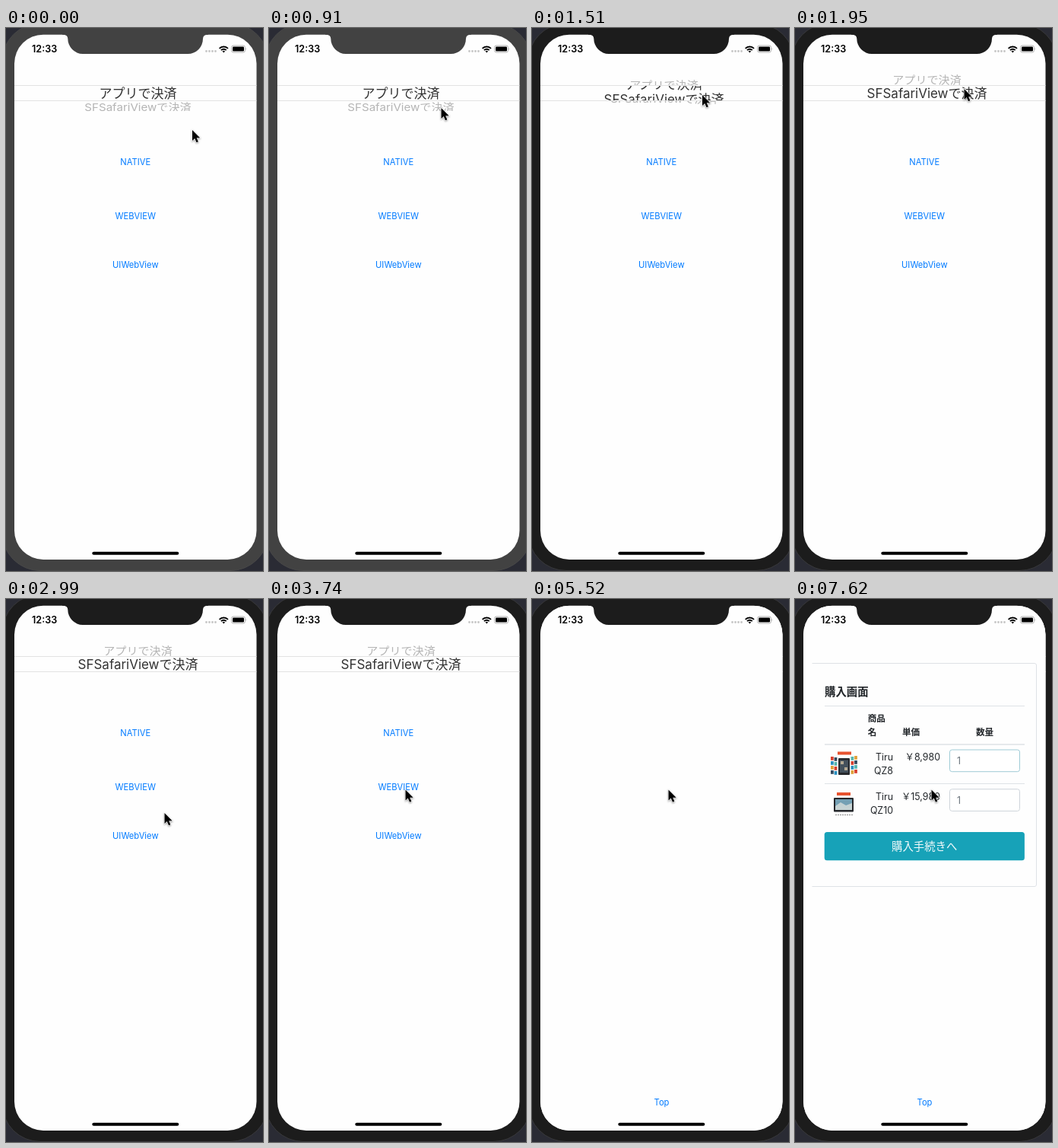
An HTML page for the animation above (8000 ms loop, 338x713 px).

```html
<!DOCTYPE html>
<html lang="ja">
<head>
<meta charset="utf-8">
<style>
  html, body { margin: 0; width: 100%; height: 100%; overflow: hidden; background: #2a2b34; }
  svg { display: block; width: 338px; height: 713px; }
  text { font-family: Inter, "Noto Sans CJK JP", "Noto Sans CJK", sans-serif; }
  .mid { text-anchor: middle; }
  .end { text-anchor: end; }
  .link { font-size: 11.2px; fill: #007aff; text-anchor: middle; }
  .head { font-size: 11.6px; font-weight: 700; }
  .cell { font-size: 12.4px; }
  .page { fill: #212529; }
  .rule { stroke: #dee2e6; fill: none; }
  .field { fill: #fff; stroke: #ced4da; }
</style>
</head>
<body>
<svg viewBox="0 0 338 713">
  <defs>
    <clipPath id="screen"><rect x="11" y="8.7" width="318.5" height="689.3" rx="38"/></clipPath>
    <clipPath id="band"><rect x="11" y="76" width="319" height="19"/></clipPath>
    <clipPath id="rim"><path d="M11 61H330V75H11ZM11 96H330V109H11Z"/></clipPath>
  </defs>
  <rect id="bezel" x="-5" y="-6" width="350" height="718.5" rx="50" stroke="#3c3c3e"/>

  <g clip-path="url(#screen)">
    <rect width="338" height="713" fill="#fefefe"/>
    <g clip-path="url(#rim)" id="outer" fill="#b4b4b4" font-size="15.1"></g>
    <g clip-path="url(#band)" id="inner" fill="#333" font-size="17"></g>
    <path d="M11 75.5H330M11 95.5H330" stroke="#e2e2e2"/>
    <text class="link" x="170.3" y="179.8">NATIVE</text>
    <text class="link" x="170.3" y="251.3" id="webview">WEBVIEW</text>
    <text class="link" x="170.3" y="315.3">UIWebView</text>

    <g id="modal">
      <rect y="9" width="338" height="713" fill="#fefefe"/>
      <text class="link" x="170.5" y="664.5">Top</text>
      <g id="shop" class="page">
        <path class="rule" d="M22.5 84.5H315Q317.5 84.5 317.5 87V375Q317.5 377.5 315 377.5H22.5"/>
        <text x="39" y="127" font-size="14.4" font-weight="700">購入画面</text>
        <path class="rule" d="M39 140.5H302M39 242.5H302"/>
        <path class="rule" d="M39 191H302" stroke-width="1.6"/>
        <g class="head">
          <text x="95.7" y="161">商品</text><text x="95.7" y="179.3">名</text>
          <text x="141" y="179.3">単価</text><text x="238" y="179.3">数量</text>
        </g>
        <g id="rows"></g>
        <rect x="38.7" y="306" width="263.2" height="37.3" rx="3.5" fill="#17a2b8"/>
        <text class="mid" x="170.2" y="330" font-size="14.4" fill="#f2fafb">購入手続きへ</text>
        <rect x="56" y="200.5" width="18" height="4" fill="#e8532f"/>
        <g id="tiles"></g>
        <rect x="57" y="209" width="15" height="22" rx="1" fill="#26282c"/>
        <rect x="59" y="211.500" width="11" height="16.500" fill="#44515c"/>
        <path d="M60 213H64V217H60ZM65 221H69V225H65Z" fill="#b3a892"/>
        <rect x="55" y="254" width="18" height="4" fill="#e8532f"/>
        <rect x="51" y="261" width="26" height="18.500" rx="1" fill="#25272b"/>
        <rect x="53" y="263" width="22" height="14" fill="#74a0b4"/>
        <path d="M53 272L60 267L67 271L75 268V277H53Z" fill="#c5d2d3"/>
        <path d="M53 283.500H76" stroke="#888" stroke-dasharray="2 1"/>
      </g>
    </g>

    <text x="34" y="32" font-size="12.6" font-weight="600">12:33</text>
    <path d="M263.500 30.500H278" stroke="#c6c6c6" stroke-width="2.800" stroke-linecap="round" stroke-dasharray="0 4"/>
    <g fill="none" stroke="#000" stroke-width="1.900">
      <path d="M280.600 26.900A8 8 0 0 1 292 26.900M282.900 29.200A4.700 4.700 0 0 1 289.700 29.200"/>
      <path d="M284.500 30.600A2.600 2.600 0 0 1 288.100 30.600L286.300 32.400Z" fill="#000" stroke="none"/>
    </g>
    <rect x="296.500" y="23" width="18" height="9" rx="2.500" fill="none" stroke="#aaa" stroke-width=".9"/>
    <rect x="298" y="24.400" width="15" height="6.200" rx="1.300"/>
    <path d="M315.700 26Q317.200 27.500 315.700 29Z" fill="#999"/>
    <rect x="113.300" y="687.700" width="114" height="4" rx="2"/>
  </g>

  <path id="notch" d="M74 8H266V8.700Q259 8.700 259 14A20 20 0 0 1 239 34H101A20 20 0 0 1 81.300 14Q81.300 8.700 74 8.700Z"/>
  <path id="cursor" d="M0 0V14L3.200 11.100L5.500 16.300L7.900 15.300L5.700 10.200H10.200Z"
    stroke="#fff" stroke-width="1.200" paint-order="stroke" style="filter:drop-shadow(0 1px 1px #0006)"/>
</svg>
<script>
const LOOP = 8000, OPTIONS = ["アプリで決済", "SFSafariViewで決済"];
const $ = id => document.getElementById(id);

// Screen updates as [time, ...values]; each holds until the next.
const CURSOR = [
  [0, 245, 134], [150, 232, 120], [290, 224, 112], [620, 225, 110], [760, 226, 107], [910, 226.500, 105],
  [1360, 226, 98], [1500, 224, 88], [1650, 222.500, 80],
  [2550, 221, 96], [2700, 215, 175], [2840, 210, 256], [2990, 208.500, 281],
  [3290, 204, 277], [3440, 192, 264], [3590, 182, 252], [3740, 179.500, 250.500]
];
const SCROLL = [[0, 0], [1360, .2], [1500, .6], [1650, .93], [1950, 1]];
const SLIDE_TIMES = [[0], [4490], [4630], [4780], [4930]];
const at = (steps, t) => steps.findLast(step => step[0] <= t);

for (const id of ["outer", "inner"])
  $(id).innerHTML = OPTIONS.map(s => `<text class="mid">${s}</text>`).join("");

$("rows").innerHTML = [["QZ8", "8,980", "#9fcbd6"], ["QZ10", "15,980", "#ced4da"]].map(([model, price, edge], i) =>
  `<g class="cell" transform="translate(0 ${i * 51.700})">
    <text class="end" x="129" y="212">Tiru</text><text class="end" x="129" y="230.300">${model}</text>
    <text class="end" x="191" y="212">￥${price}</text>
    <rect class="field" x="203.500" y="198" width="92" height="28.700" rx="3" style="stroke:${edge}"/>
    <text x="213" y="217" fill="#6c757d">1</text></g>`).join("");

const COLORS = ["#d8402f", "#2a8fc0", "#e0a13a", "#34495e", "#57b5ae"];
$("tiles").innerHTML = Array.from({ length: 16 }, (_, i) => {
  const right = i > 7, col = i % 2, row = (i % 8) >> 1;
  return `<rect x="${(right ? 73.500 : 47) + col * 4.600}" y="${207 + row * 6 + (right ? -col : col)}" width="3.800" height="4.800" fill="${COLORS[i * 3 % 5]}"/>`;
}).join("");

function placeRows(id, pitch, baseline, squash, scroll) {
  [...$(id).children].forEach((row, i) => {
    const y = 86 + (i - scroll) * pitch;
    row.setAttribute("transform", `translate(173.500 ${y}) scale(1 ${squash}) translate(0 ${baseline})`);
  });
}

// Critically damped slide of the sheet from the bottom edge.
function sheetOffset(t) {
  const u = Math.max(0, at(SLIDE_TIMES, t)[0] - 4433) * .0189;
  const y = 704 * (1 + u) * Math.exp(-u);
  return y < 1 ? 0 : y;
}

function draw(now) {
  const t = now % LOOP;
  const [, x, y] = at(CURSOR, t), scroll = at(SCROLL, t)[1];
  const body = t < 1210 ? "#424242" : "#1c1c1c";
  $("bezel").setAttribute("fill", body);
  $("bezel").setAttribute("stroke", t < 1210 ? "#484848" : "#39393b");
  $("notch").setAttribute("fill", body);
  $("cursor").setAttribute("transform", `translate(${x} ${y})`);
  placeRows("outer", 18.300, 5.600, .88, scroll);
  placeRows("inner", 20, 6.200, 1, scroll);
  $("webview").setAttribute("opacity", t >= 4340 && t < 4490 ? .2 : 1);
  $("modal").setAttribute("transform", `translate(0 ${sheetOffset(t)})`);
  $("shop").setAttribute("visibility", t < 7620 ? "hidden" : "visible");
  requestAnimationFrame(draw);
}
draw(0);
</script>
</body>
</html>
```
